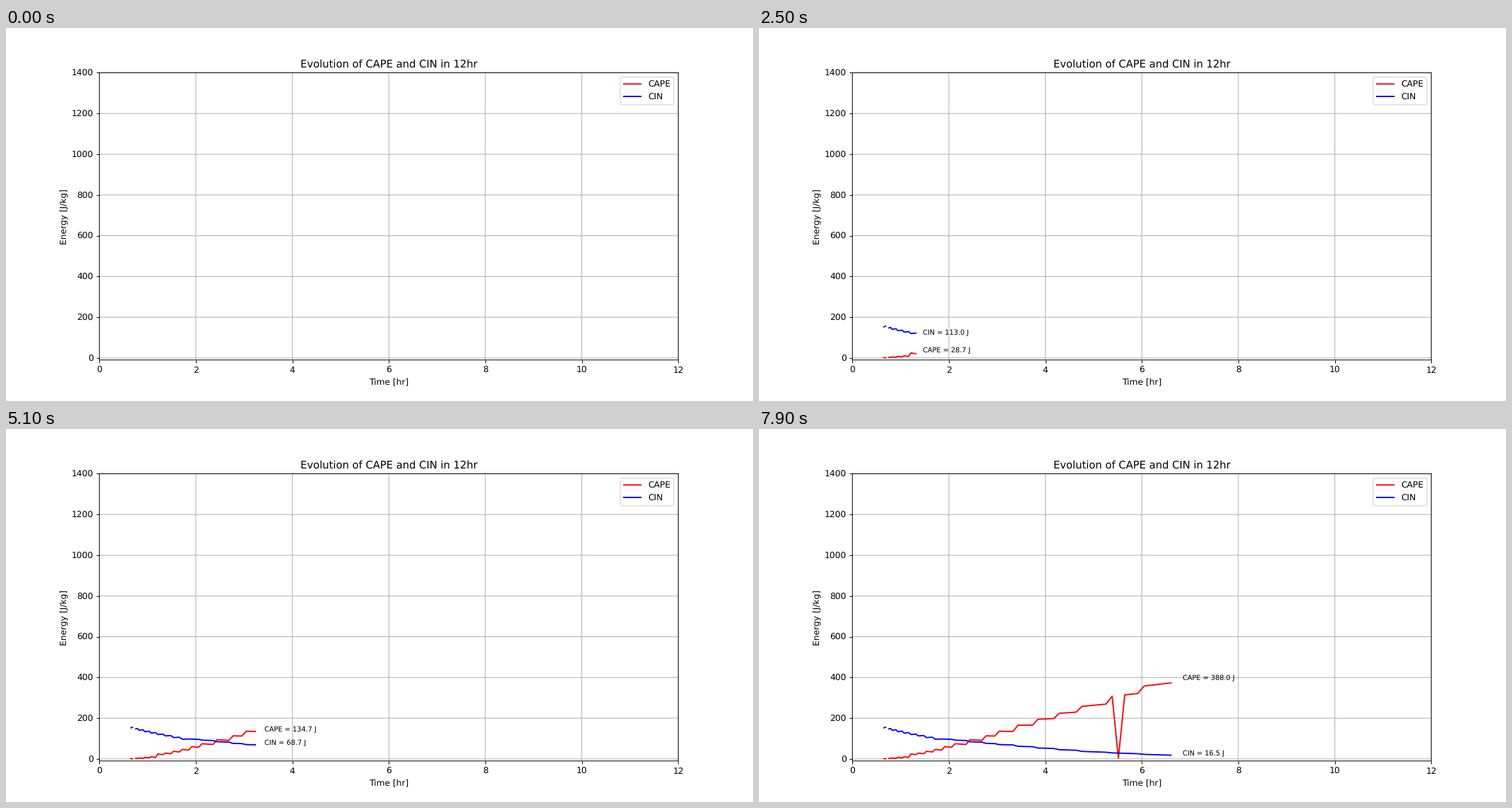
Write a matplotlib script that moves like this. It is 1058 px wide and 529 px high and loops after 8000 ms.

```python
import numpy as np
import matplotlib.pyplot as plt
from matplotlib.animation import FuncAnimation

STEPS = 80
LABEL_GAP = 0.09

steps = np.arange(STEPS)

# The model time step grows smoothly: a quartic through a few known hours.
fit_steps = [5, 13, 25, 37, 51, 69, 78]
fit_hours = [0.564, 0.823, 1.373, 2.127, 3.329, 5.386, 6.605]
hours = np.polyval(np.polyfit(fit_steps, fit_hours, 4), steps)

# Both energies jump to a new level at these steps and drift in between.
jumps = np.array([*range(4, 38, 3), 41, 45, 48, 52, 56, 60, 64, 69, 74, 79])
begin = jumps[np.maximum(np.searchsorted(jumps, steps, "right") - 1, 0)]


def staircase(level, drift):
    """Levels and drifts per step, given as (step, value) key points."""
    def at_jump(keys):
        return np.interp(begin, *zip(*keys))

    values = at_jump(level) + (steps - begin) * at_jump(drift)
    values[:5] = values[[6, 7, 10]] = np.nan
    return values


cape = staircase(
    level=[(4, 1), (13, 4.9), (19, 10.4), (22, 24.5), (25, 28.7), (31, 46.5),
           (37, 74.7), (45, 113.5), (48, 136), (60, 224), (64, 258),
           (74, 358), (79, 388)],
    drift=[(10, -0.6), (22, -1.7), (34, -1.7), (37, -1.2), (48, -0.43),
           (64, 2.775), (74, 3.8)])
cape[70] = 3  # one-step dropout
cin = staircase(
    level=[(4, 154.4), (13, 140.3), (25, 113), (31, 96.7), (34, 97.5),
           (37, 92.2), (48, 70.3), (64, 37), (74, 22.5), (79, 16.5)],
    drift=[(7, 3), (13, 1.6), (31, 0.6), (34, -0.6), (48, -0.533),
           (64, -1.025)])

plt.rcParams.update({"font.family": "DejaVu Sans", "text.hinting": "none",
                     "path.snap": False})
fig, ax = plt.subplots(figsize=(12, 6), dpi=88.1667)
ax.set(xlim=(0, 12), ylim=(-10, 1400), xlabel="Time [hr]",
       ylabel="Energy [J/kg]", title="Evolution of CAPE and CIN in 12hr")
ax.grid()


def add_curve(name, values, color):
    line, = ax.plot([], [], color=color, label=name)
    label = ax.text(0, 0, "", fontsize=8)
    return name, values, line, label


curves = [add_curve("CAPE", cape, "red"), add_curve("CIN", cin, "blue")]
ax.legend(loc="upper right")


def update(i):
    for name, values, line, label in curves:
        line.set_data(hours[:i], values[:i])
        if np.isnan(values[i]):
            label.set_text("")
        else:
            label.set_position((hours[i] + LABEL_GAP, values[i]))
            label.set_text(f"{name} = {values[i]:.1f} J")
    return [artist for curve in curves for artist in curve[2:]]


anim = FuncAnimation(fig, update, frames=STEPS, interval=100, repeat=True,
                     repeat_delay=0, init_func=lambda: update(0))
plt.show()
```
